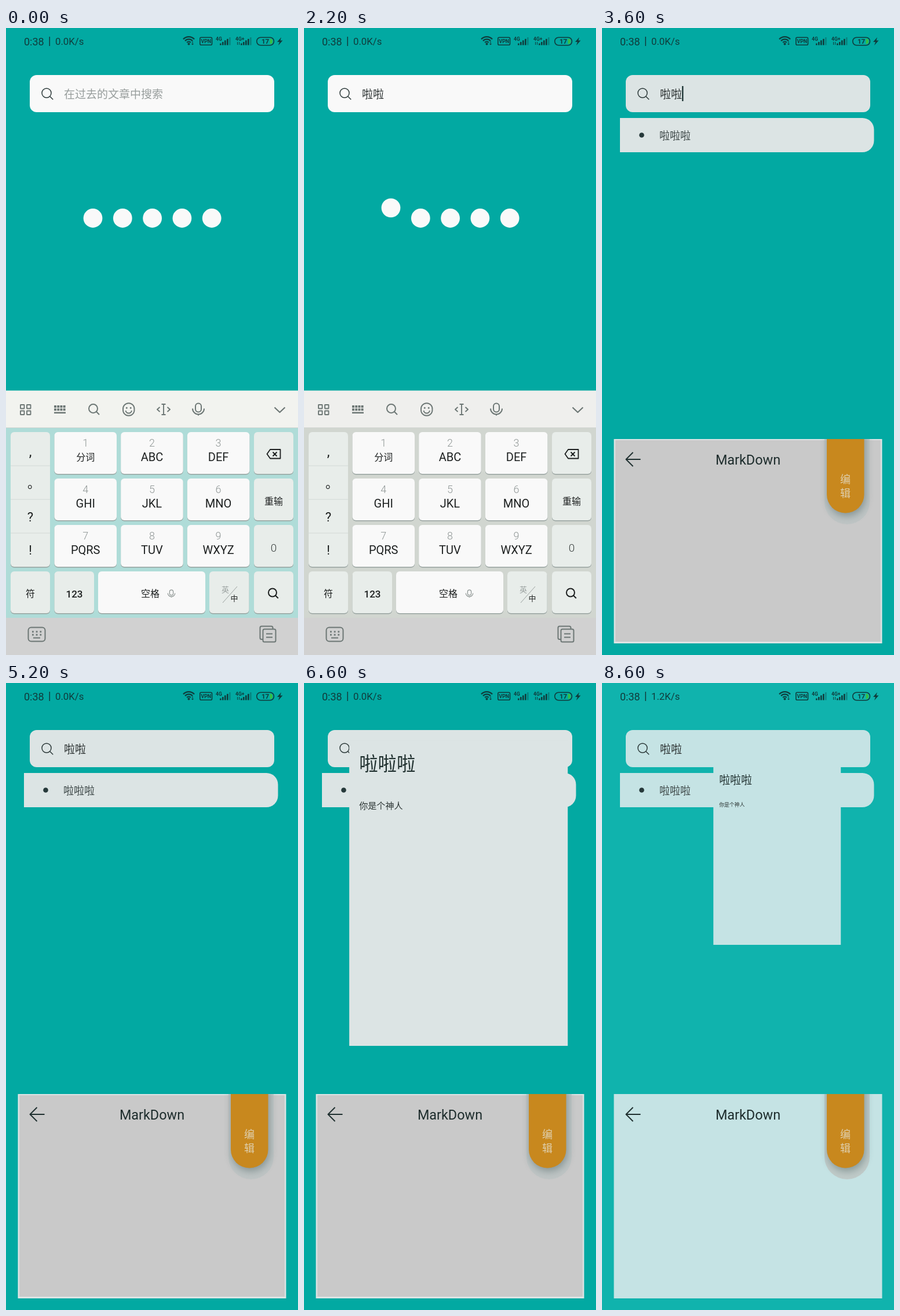
An HTML page with a canvas that plays this animation: 504x1080 px, repeating every 8800 ms.

```html
<!DOCTYPE html>
<html lang="zh-CN">
<head>
<meta charset="utf-8">
<title>搜索</title>
<style>
html, body { margin: 0; width: 100%; height: 100%; overflow: hidden; background: #02a9a2; }
canvas { display: block; width: 504px; height: 1080px; }
</style>
</head>
<body>
<canvas id="stage" width="504" height="1080"></canvas>
<script>
const g = document.getElementById('stage').getContext('2d');
const LOOP = 8800, STEP = 200;
const FONT = 'Roboto, "Noto Sans CJK SC", "Noto Sans CJK", sans-serif';
const INK = '#103c3c', ICON = '#6d7775';

function box(x, y, x2, y2, r, fill) {
  g.beginPath();
  g.roundRect(x, y, x2 - x, y2 - y, r);
  g.fillStyle = fill;
  g.fill();
}

function frame(x, y, x2, y2, r, color, width) {
  g.beginPath();
  g.roundRect(x, y, x2 - x, y2 - y, r);
  g.strokeStyle = color;
  g.lineWidth = width;
  g.stroke();
}

function dot(x, y, r, fill) {
  g.beginPath();
  g.arc(x, y, r, 0, 7);
  g.fillStyle = fill;
  g.fill();
}

function path(d, color, width) {
  g.strokeStyle = color;
  g.lineWidth = width;
  g.stroke(new Path2D(d));
}

// y is the visual middle of the glyphs
function text(s, x, y, size, color, align = 'left', weight = 400) {
  g.font = `${weight} ${size}px ${FONT}`;
  g.textAlign = align;
  g.fillStyle = color;
  g.fillText(s, x, y + size * (/[\u3000-\u9fff]/.test(s) ? 0.38 : 0.355));
}

const label = (s, x, y, size, color = '#1c1f1f', weight = 400) => text(s, x, y, size, color, 'center', weight);

function magnifier(x, y, r, color, width) {
  const a = r * 0.71, b = r * 1.4;
  path(`M${x + r} ${y}A${r} ${r} 0 1 1 ${x - r} ${y}A${r} ${r} 0 1 1 ${x + r} ${y}M${x + a} ${y + a}L${x + b} ${y + b}`, color, width);
}

function mic(x, y, k, color, width) {
  frame(x - 5 * k, y - 10 * k, x + 5 * k, y + 5 * k, 5 * k, color, width);
  path(`M${x - 10 * k} ${y - k}A${10 * k} ${10 * k} 0 0 0 ${x + 10 * k} ${y - k}`, color, width);
  path(`M${x} ${y + 9 * k}V${y + 11 * k}`, color, width);
}

function palette(t) {
  const p = { bg: '#02a9a2', paper: '#f9f9f9', panel: '#c9c9c9', edge: '#dce4e4', halo: '#b9c4c3' };
  if (t >= 8600) Object.assign(p, { bg: '#10b3ad', paper: '#c5e3e4', panel: '#c5e3e4', edge: '#c5e3e4', halo: '#bebcb7' });
  else if (t >= 7000) Object.assign(p, { panel: '#b3dedd', edge: '#c7c9c8', halo: '#c3c1bc' });
  else if (t >= 2400) p.paper = '#dce4e4';
  return p;
}

function signal(x, tag) {
  text(tag, x, 18.5, 8.5, INK, 'left', 700);
  const left = x + (tag.length > 2 ? 9 : 7);
  for (let i = 0; i < 5; i++) {
    const h = 3 + i * 2.6;
    g.globalAlpha = i < 4 ? 1 : 0.35;
    box(left + i * 4, 29.5 - h, left + i * 4 + 2.6, 29.5, 0.5, INK);
  }
  g.globalAlpha = 1;
}

function status(t) {
  text('0:38', 31, 23.5, 18, INK);
  box(74.5, 15, 76, 31, 0, INK);
  text(t >= 8600 ? '1.2K/s' : '0.0K/s', 85, 23.5, 16.8, INK);

  for (let i = 0; i < 3; i++) {
    const r = 4.5 + i * 4.2, a = r * 0.74, b = r * 0.67;
    path(`M${315.5 - a} ${28 - b}A${r} ${r} 0 0 1 ${315.5 + a} ${28 - b}`, INK, 2.2);
  }
  dot(315.5, 27.5, 2, INK);
  path('M322 23V29M320.500 27L322 29L323.500 27', INK, 1);

  frame(334.8, 16.3, 355.5, 29.3, 2, INK, 1.6);
  label('VPN', 345.2, 23, 8.8, INK, 700);
  signal(362, '4G');
  signal(396, '4G+');
  path('M399.500 29V24M402.500 24V29', INK, 1);

  frame(432.8, 16.2, 462.4, 29.8, 6.5, INK, 1.6);
  box(455.5, 18.5, 460, 27.5, [0, 4, 4, 0], '#35c045');
  label('17', 447.5, 23, 11.5, INK, 700);
  g.fillStyle = INK;
  g.fill(new Path2D('M475 16L468 24H472L470 30L477.500 21.500H473.500Z'));
}

function search(t, p) {
  box(41, 81, 463, 145, 12, p.paper);
  magnifier(70, 112, 8, '#2b3838', 1.5);
  if (t < 1400) return text('在过去的文章中搜索', 100, 114, 19, '#979d9c', 'left', 300);
  text('啦啦', 100, 114, 19, '#2a3030');
  if (t >= 2400 && t < 6200 && t % 1000 >= 500) box(138, 100, 140.5, 126, 0, '#263c3c');
}

function loader(t, p) {
  for (let i = 0; i < 5; i++) {
    const k = (t - 2100 - i * 100) / 500;
    const lift = k > 0 && k < 1 ? 30 * Math.sin(Math.PI * k) : 0;
    dot(150 + i * 51.3, 327.5 - lift, 16.4, p.paper);
  }
}

function result(p) {
  box(31, 155, 469.5, 214, [0, 20, 20, 0], p.paper);
  dot(68.5, 184.5, 4.3, '#26393a');
  text('啦啦啦', 99, 185.5, 18, '#3d4747', 'left', 300);
}

function sheet(p) {
  box(20.5, 708, 483.5, 1060, 0, p.edge);
  box(23, 710, 481, 1057, 0, p.panel);
  path('M66.500 743H42M53.500 731L41.500 743L53.500 755', '#1f2f2f', 2);
  label('MarkDown', 252, 744, 23.4, '#1d2c2c');

  g.save();
  g.beginPath();
  g.rect(376, 708, 100, 160);
  g.clip();
  g.globalAlpha = 0.6;
  box(384, 700, 462, 855, [0, 0, 39, 39], p.halo);
  g.globalAlpha = 1;
  g.shadowColor = 'rgba(40,70,70,.4)';
  g.shadowBlur = 14;
  g.shadowOffsetX = 2;
  g.shadowOffsetY = 5;
  box(388, 690, 452.5, 835.5, [0, 0, 32, 32], '#c8881e');
  g.restore();
  label('编', 420, 777.5, 18, '#dfd0b0');
  label('辑', 420, 801.5, 18, '#dfd0b0');
}

function cardScale(t) {
  const out = k => 1 - Math.pow(1 - Math.min(1, Math.max(0, k)), 3);
  return t < 8500 ? out((t - 6411) / 400) : 1 - out((t - 8517) / 400);
}

// The page grows from, and shrinks to, the tapped point
function card(t, p) {
  const s = cardScale(t);
  if (s <= 0) return;
  g.save();
  g.translate(352, 207);
  g.scale(s, s);
  g.translate(-352, -207);
  if (s === 1) {
    g.shadowColor = 'rgba(0,0,0,.3)';
    g.shadowBlur = 2;
    g.shadowOffsetY = 1;
  }
  box(31, 81, 473, 697, 0, p.paper);
  g.shadowColor = 'transparent';
  text('啦啦啦', 51, 127, 38, '#20302f', 'left', 300);
  text('你是个神人', 51, 212.5, 17.7, '#2c3534', 'left', 300);
  if (s === 1) box(51, 173.6, 453, 174.8, 0, '#e3e5e4');
  g.restore();
}

function key(x, y, x2, y2, fill) {
  box(x, y + 1, x2, y2 + 1.5, 6, '#98a3a0');
  box(x, y, x2, y2, 6, fill);
}

function toolbar() {
  for (let i = 0; i < 4; i++) {
    const x = 25 + (i % 2) * 11, y = 649 + (i >> 1) * 10.5;
    frame(x, y, x + 6.5, y + 6.5, 0.5, ICON, 1.9);
  }
  for (let i = 0; i < 8; i++) {
    const x = 83 + (i % 4) * 5.2, y = 650 + (i >> 2) * 5.2;
    box(x, y, x + 4, y + 4, 0.5, ICON);
  }
  box(83, 661.5, 103, 664, 0, ICON);
  magnifier(150.5, 655.5, 7.5, ICON, 2);
  path('M221.500 657A9.800 9.800 0 1 1 202 657A9.800 9.800 0 1 1 221.500 657M206.500 659A5.300 5.300 0 0 0 217 659', ICON, 1.9);
  dot(208.3, 654.5, 1.4, ICON);
  dot(215.2, 654.5, 1.4, ICON);
  path('M272 648V666M268.500 648H275.500M268.500 666H275.500M265.500 653L261 657L265.500 661M278.500 653L283 657L278.500 661', ICON, 1.9);
  mic(332, 656.5, 1, ICON, 2);
  path('M463.500 653.500L472.500 662L481.500 653.500', ICON, 2.2);
}

function keyboard(t) {
  const early = t < 1400, soft = '#e8edea', white = '#f9f9f9';
  box(0, 624.5, 504, 689, 0, early ? '#f2f3ef' : '#efefed');
  box(0, 689, 504, 1016, 0, early ? '#afdcd8' : '#d1d6d0');
  box(0, 1016, 504, 1080, 0, '#d1d1d1');
  box(0, 688, 504, 689, 0, '#d1d6d2');
  toolbar();

  key(8, 696, 76, 928, soft);
  for (let i = 1; i < 4; i++) box(8, 695.5 + i * 58, 76, 696.5 + i * 58, 0, '#d3dad7');
  label(',', 42, 729, 24);
  text('。', 37, 784, 22, '#1c1f1f');
  label('?', 42, 842, 22);
  label('!', 42, 899.5, 22);

  ['分词', 'ABC', 'DEF', 'GHI', 'JKL', 'MNO', 'PQRS', 'TUV', 'WXYZ'].forEach((s, i) => {
    const x = 83.5 + (i % 3) * 114.7, y = 696 + Math.floor(i / 3) * 80;
    key(x, y, x + 107.5, y + 72, white);
    label(i + 1, x + 53.7, y + 19, 18, '#8f9695', 300);
    label(s, x + 53.7, y + 43, i ? 20 : 16);
  });

  for (let i = 0; i < 3; i++) key(428, 696 + i * 80, 496, 768 + i * 80, soft);
  path('M456 726H473.500V741.500H456L450.500 733.700ZM460.500 730.500L467.500 737.500M467.500 730.500L460.500 737.500', '#1c1f1f', 1.8);
  label('重输', 462, 814.5, 16, '#1c1f1f', 500);
  label('0', 462, 895, 19, '#3c4241', 300);

  [[8, 76], [83.5, 152], [159, 344], [351, 419.5], [428, 496]].forEach(([a, b], i) =>
    key(a, 936, b, 1008, i === 2 ? white : soft));
  label('符', 42, 974, 16, '#1c1f1f', 500);
  label('123', 118, 974.5, 17, '#1c1f1f', 500);
  label('空格', 249, 974, 16, '#1c1f1f', 500);
  mic(285.5, 974, 0.62, '#8c9492', 1.2);
  label('英', 378.5, 967, 13, '#9aa19f');
  label('中', 394, 982, 13, '#1c1f1f', 500);
  path('M374 990L399 962', '#9aa19f', 1);
  magnifier(460, 972.5, 7, '#1c1f1f', 2);

  frame(38.5, 1032.5, 67.5, 1056.5, 5, ICON, 2);
  for (let i = 0; i < 6; i++) {
    const x = 45 + (i % 3) * 6.7, y = 1038.5 + (i >> 2) * 5.5;
    if (i < 3) { box(x, y, x + 2.8, y + 2.8, 0, ICON); box(x, y + 5.3, x + 2.8, y + 8.1, 0, ICON); }
  }
  box(47, 1049.5, 59, 1051.5, 0, ICON);
  path('M443 1053H441Q438.500 1053 438.500 1050.500V1033Q438.500 1030.500 441 1030.500H458Q460.500 1030.500 460.500 1033V1035', ICON, 2);
  frame(443.5, 1035.5, 465.5, 1057.5, 2.5, ICON, 2);
  path('M449 1043.500H460M449 1049.500H460', ICON, 2);
}

function draw(t) {
  const p = palette(t);
  g.lineCap = 'butt';
  g.lineJoin = 'round';
  box(0, 0, 504, 1080, 0, p.bg);
  status(t);
  search(t, p);
  if (t < 3200) loader(t, p);
  else result(p);
  if (t < 2400) keyboard(t);
  else sheet(p);
  card(t, p);
}

const start = performance.now();
function tick() {
  const t = (performance.now() - start) % LOOP;
  draw(Math.floor(t / STEP) * STEP);
  requestAnimationFrame(tick);
}
tick();
</script>
</body>
</html>
```
